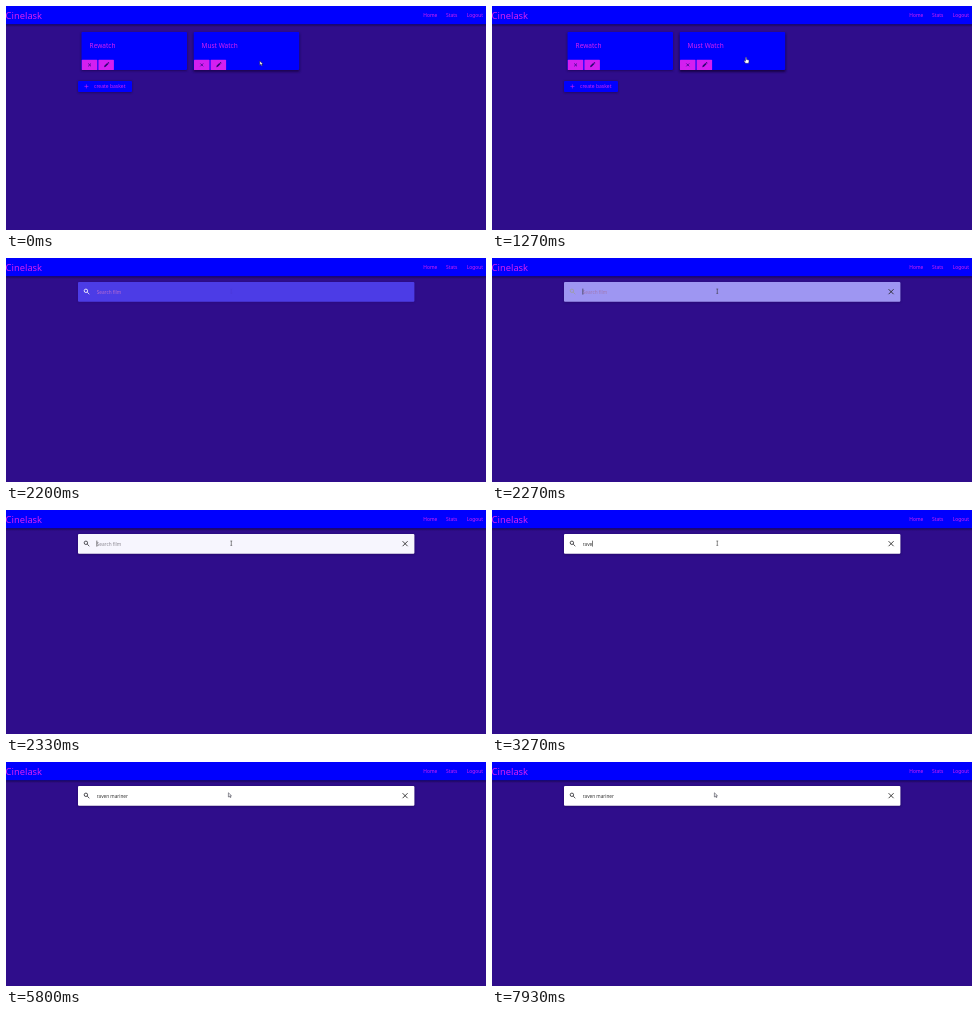
An HTML page for the animation above (8000 ms loop, 480 by 224 pixels).

```html
<!DOCTYPE html>
<html lang="en">
<head>
<meta charset="utf-8">
<title>Film baskets</title>
<style>
  html, body { margin: 0; width: 100%; height: 100%; overflow: hidden; background: #2f0d8b; }
  svg { display: block; width: 480px; height: 224px; }
  text { font-family: "Noto Sans", "Open Sans", sans-serif; fill: #d41ff0; white-space: pre; }
  .logo { font-size: 9.35px; }
  .nav { font-size: 4.9px; }
  .name { font-size: 6.5px; font-weight: 300; }
  .label { font-size: 5px; }
  .field { font-size: 4.7px; }
  .blue { fill: #0000fe; }
  .pink { fill: #d41ff0; }
  .line { fill: none; stroke-width: .85; }
</style>
</head>
<body>
<svg viewBox="0 0 480 224">
  <defs>
    <linearGradient id="fade" x1="0" y1="0" x2="0" y2="1">
      <stop offset="0" stop-color="#12043c" stop-opacity=".75"/>
      <stop offset="1" stop-color="#12043c" stop-opacity="0"/>
    </linearGradient>
    <filter id="soft" x="-10%" y="-30%" width="120%" height="160%">
      <feGaussianBlur stdDeviation="1.3"/>
    </filter>
    <g id="tools">
      <rect class="pink" width="15.5" height="10.2" rx=".6"/>
      <rect class="pink" x="16.6" width="15.5" height="10.2" rx=".6"/>
      <path class="line" stroke="#3a0a8c" d="M6.4 3.7l2.8 2.8M9.2 3.7L6.4 6.5"/>
      <path fill="#2a0870" d="M22.3 7.4l.4-1.6 2.7-2.7 1.2 1.2-2.7 2.7zM25.8 2.7l.6-.6 1.2 1.2-.6.6z"/>
    </g>
  </defs>

  <rect width="480" height="224" fill="#2f0d8b"/>
  <rect y="18" width="480" height="3" fill="url(#fade)"/>
  <rect class="blue" width="480" height="18.2"/>
  <text class="logo" x="-.4" y="12.7">Cinelask</text>
  <text class="nav" x="417.3" y="10.8">Home</text>
  <text class="nav" x="440" y="10.8">Stats</text>
  <text class="nav" x="460.8" y="10.8">Logout</text>

  <g id="home">
    <rect x="75.5" y="27" width="105.5" height="38" fill="#12043c" opacity=".6" filter="url(#soft)"/>
    <rect id="lift" x="187.5" y="27.5" width="106" height="38.5" fill="#12043c" filter="url(#soft)"/>
    <rect class="blue" x="75.5" y="26" width="105.5" height="38" rx="1"/>
    <rect class="blue" x="187.7" y="26" width="105.5" height="38" rx="1"/>
    <text class="name" x="83.6" y="41.6">Rewatch</text>
    <text class="name" x="195.6" y="41.6">Must Watch</text>
    <use href="#tools" x="75.8" y="53.8"/>
    <use href="#tools" x="188" y="53.8"/>
    <rect x="72" y="75.6" width="54" height="11" fill="#12043c" opacity=".6" filter="url(#soft)"/>
    <rect class="blue" x="72" y="75" width="54" height="11" rx="1"/>
    <path class="line" stroke="#d41ff0" style="stroke-width:.6" d="M78.4 80.4h4M80.4 78.4v4"/>
    <text class="label" x="88" y="82.2">create basket</text>
  </g>

  <g id="search">
    <rect id="shade" x="72" y="24.8" width="336.4" height="19.6" fill="#12043c" filter="url(#soft)"/>
    <rect id="bar" x="72" y="24" width="336.4" height="19.7" rx="1"/>
    <g id="lens" class="line">
      <circle cx="79.9" cy="32.8" r="1.7"/>
      <path d="M81.2 34.1l2.1 2.1"/>
    </g>
    <text id="hint" class="field" x="90.7" y="35.7">Search film</text>
    <text id="query" class="field" x="90.7" y="35.7" style="fill:#333"></text>
    <rect id="caret" y="30.6" width=".6" height="6" fill="#222"/>
    <path id="clear" class="line" stroke="#222" d="M396.6 31.2l5 5M401.6 31.2l-5 5"/>
  </g>

  <g id="mouse">
    <path id="arrow" fill="#fff" stroke="#223" stroke-width=".5" d="M0 0v4.2l1-.9.7 1.5.8-.4-.7-1.4h1.3z"/>
    <path id="hand" fill="#fff" stroke="#223" stroke-width=".4" d="M-.5 0q.5-.5 1 0v2l2.1.6q.5.3.4 1L2.6 5.8H-.5L-2 3.6q.2-.7.8-.4l.7.5z"/>
    <path id="beam" fill="none" stroke="#333" stroke-width=".55" d="M-.9-2.2h1.8M0-2.2v4.4M-.9 2.2h1.8"/>
  </g>
</svg>
<script>
const LOOP = 8000;
const PAGE = 1670, HOVER = 2000, FOCUS = 2270, LEAVE = 5670, BLINK = 530;
const QUERY = "raven mariner";
const KEYS = [2800, 3000, 3130, 3270, 3470, 3600, 3800, 4000, 4130, 4530, 4800, 5070, 5270];
// time, x, y
const PATH = [
  [0, 253.8, 55], [70, 253.8, 55], [670, 253.8, 54.4], [930, 253.8, 54.4],
  [1070, 254, 51.5], [1730, 254, 51.5], [2130, 225.3, 33.2],
  [5660, 225.3, 33.2], [LEAVE, 222.4, 30.8], [LOOP, 222.4, 30.8]
];

const el = {};
document.querySelectorAll("svg [id]").forEach(node => el[node.id] = node);

const clamp = v => Math.max(0, Math.min(1, v));
const ease = v => v * v * (3 - 2 * v);
const ramp = (t, from, to) => ease(clamp((t - from) / (to - from)));
const mix = (a, b, k) => a.map((v, i) => v + (b[i] - v) * k);
const rgb = c => `rgb(${c.map(Math.round).join()})`;
const show = (node, on) => node.setAttribute("visibility", on ? "inherit" : "hidden");
const set = (node, key, value) => node.setAttribute(key, value);

function pointAt(t) {
  const i = Math.max(1, PATH.findIndex(p => p[0] > t));
  const [a, b] = [PATH[i - 1], PATH[i]];
  return mix(a.slice(1), b.slice(1), ramp(t, a[0], b[0]));
}

function drawMouse(t) {
  const [x, y] = pointAt(t);
  set(el.mouse, "transform", `translate(${x} ${y})`);
  show(el.arrow, t < 930 || t >= LEAVE);
  show(el.hand, t >= 930 && t < HOVER);
  show(el.beam, t >= HOVER && t < LEAVE);
  set(el.beam, "stroke", t < FOCUS ? "#4a3ad8" : "#333");
}

function drawSearch(t) {
  const idle = mix([48, 33, 213], [76, 60, 230], ramp(t, HOVER, 2200));
  const focus = ramp(t, 2200, 2350);
  set(el.bar, "fill", rgb(mix(idle, [255, 255, 255], focus)));
  set(el.shade, "opacity", .2 + .35 * focus);
  set(el.lens, "stroke", rgb(mix([255, 255, 255], [45, 45, 50], focus)));
  el.hint.style.fill = rgb(mix([184, 108, 208], [135, 135, 140], focus));

  const typed = KEYS.filter(k => k <= t).length;
  el.query.textContent = QUERY.slice(0, typed);
  show(el.hint, typed === 0);
  show(el.clear, t >= FOCUS);

  const since = t - (typed ? KEYS[typed - 1] : FOCUS);
  show(el.caret, since >= 0 && Math.floor(since / BLINK) % 2 === 0);
  set(el.caret, "x", 90.6 + (typed ? el.query.getComputedTextLength() : 0));
}

function draw(t) {
  show(el.home, t < PAGE);
  show(el.search, t >= PAGE);
  set(el.lift, "opacity", .7 + .2 * ramp(t, 70, 670));
  drawSearch(t);
  drawMouse(t);
}

const start = performance.now();
function tick() {
  draw((performance.now() - start) % LOOP);
  requestAnimationFrame(tick);
}
tick();
</script>
</body>
</html>
```
